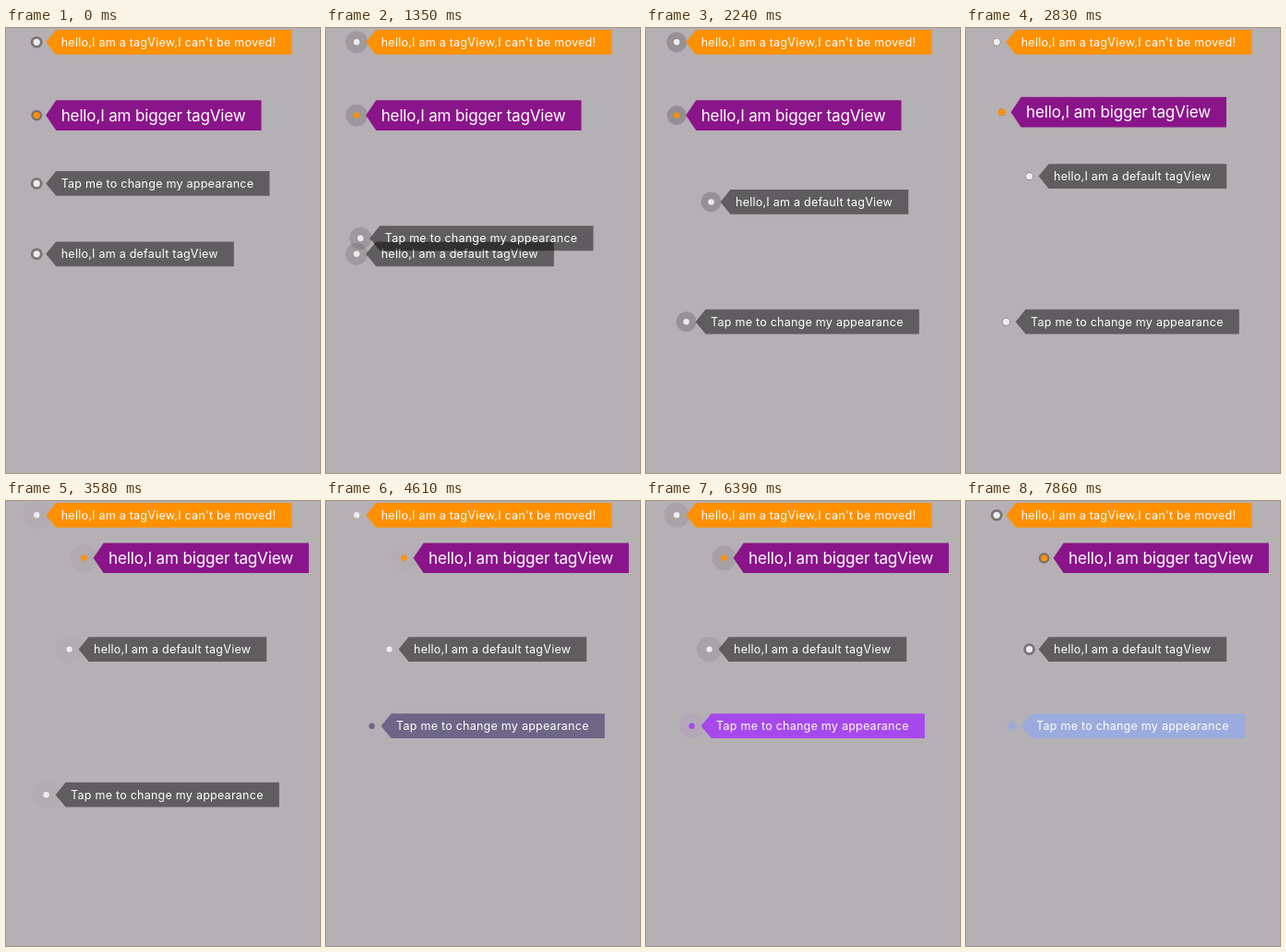
Recreate the animation shown at these times as an HTML page. Size 340 by 482 pixels, loop 8 s.

```html
<!DOCTYPE html>
<html lang="en">
<head>
<meta charset="utf-8">
<title>Tag views</title>
<style>
  html, body { margin: 0; width: 100%; height: 100%; overflow: hidden; background: #b5b0b4; }
  svg { display: block; width: 340px; height: 482px; }
  text { font: 12.5px Inter, Roboto, sans-serif; fill: #fff; letter-spacing: .25px; }
  .big { font-size: 17px; letter-spacing: -.14px; }
</style>
</head>
<body>
<svg id="stage" viewBox="0 0 340 482"></svg>
<script>
const LOOP = 8000;
const PULSE = 983;
const SPREAD = 830;  // part of a pulse in which the halo is visible
const LEAD = 150;    // how far into its pulse each halo is at the start
const LEFT = 33.2;
const SHADE = 'rgba(0,0,0,.475)';
const TAPS = { first: 4500, every: 1175, colours: ['#6e6687', '#a649ec', '#9cabdd'] };
const stage = document.getElementById('stage');

const tags = [
  { label: "hello,I am a tagView,I can't be moved!", y: 15.3, width: 276.3, fill: '#ff9000' },
  { label: 'hello,I am bigger tagView', y: 94.6, width: 243.3, fill: '#8a158a',
    dotFill: '#ff9000', big: true, lag: 25,
    drags: [{ start: 2700, time: 650, dx: 51.4, dy: -32.8 }] },
  { label: 'hello,I am a default tagView', y: 244.8, width: 213.6, fill: SHADE,
    drags: [{ start: 1650, time: 550, dx: 37.3, dy: -56.4 },
            { start: 2300, time: 350, dx: -1.9, dy: -27.8 }] },
  { label: 'Tap me to change my appearance', y: 168.4, width: 252.2, fill: SHADE, taps: TAPS,
    drags: [{ start: 1110, time: 560, dx: 10.4, dy: 149.8 },
            { start: 3620, time: 630, dx: 6, dy: -74.5 }] }
];

const clamp = v => Math.max(0, Math.min(1, v));
const smooth = v => v * v * (3 - 2 * v);

function add(parent, name, attrs = {}) {
  const node = document.createElementNS('http://www.w3.org/2000/svg', name);
  set(node, attrs);
  return parent.appendChild(node);
}

function set(node, attrs) {
  for (const key in attrs) node.setAttribute(key, attrs[key]);
}

function build(tag) {
  const half = tag.big ? 16.3 : 13.4;
  tag.group = add(stage, 'g');
  tag.halo = add(tag.group, 'circle');
  tag.dot = add(tag.group, 'circle');
  tag.body = add(tag.group, 'path', {
    d: `M10 0L21 ${-half}H${tag.width}V${half}H21Z`
  });
  const text = add(tag.group, 'text', { x: 26.5, y: tag.big ? 6 : 4.6 });
  if (tag.big) text.setAttribute('class', 'big');
  text.textContent = tag.label;
}

function place(tag, t) {
  let x = LEFT, y = tag.y;
  for (const { start, time, dx, dy } of tag.drags || []) {
    const k = smooth(clamp((t - start) / time));
    x += dx * k;
    y += dy * k;
  }
  return `translate(${x} ${y})`;
}

function tappedColour({ first, every, colours }, t) {
  const count = Math.floor((t - first) / every);
  return colours[Math.min(count, colours.length - 1)];
}

function draw(tag, t) {
  const colour = tag.taps && tappedColour(tag.taps, t);
  const age = (t + LEAD - (tag.lag || 0)) % PULSE;
  const p = clamp(age / SPREAD);
  const spread = p + .4 * p * (1 - p);
  // the dot swells slightly around the birth of each halo
  const swell = .5 * Math.sin(Math.PI * clamp(((age + 150) % PULSE) / 440));

  set(tag.group, { transform: place(tag, t) });
  set(tag.body, { fill: colour || tag.fill });
  set(tag.dot, { r: 3.2 + swell, fill: colour || tag.dotFill || '#eeecee' });
  set(tag.halo, {
    r: 3.5 + 12 * spread,
    fill: colour || '#000',
    'fill-opacity': .45 * (1 - spread)
  });
}

function frame(now) {
  const t = now % LOOP;
  tags.forEach(tag => draw(tag, t));
  requestAnimationFrame(frame);
}

tags.forEach(build);
frame(0);
</script>
</body>
</html>
```
